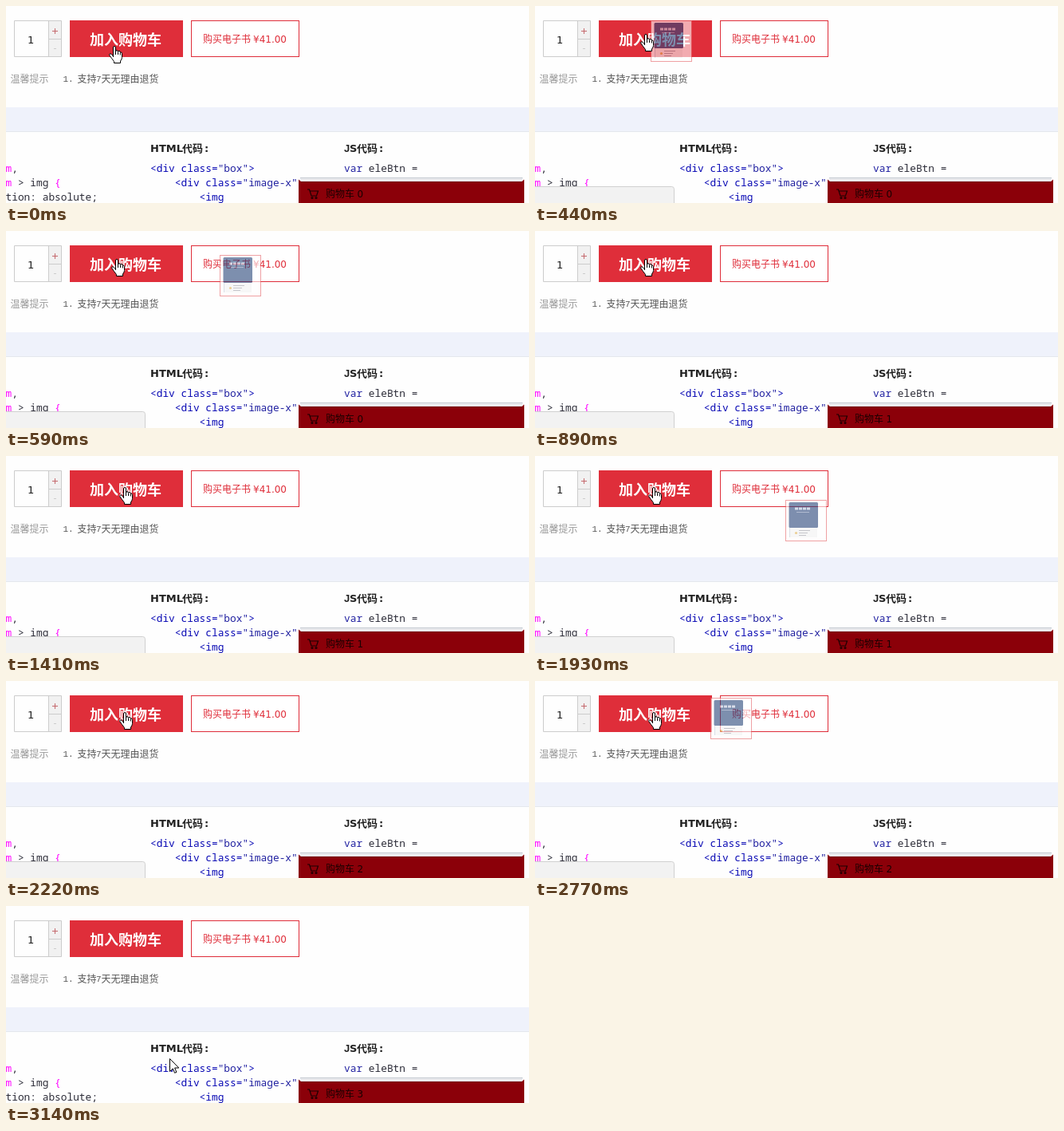
An HTML page for the animation above (4820 ms loop, 656 by 247 pixels).

```html
<!DOCTYPE html>
<html lang="zh-CN">
<head>
<meta charset="utf-8">
<title>加入购物车</title>
<style>
html, body { margin: 0; width: 100%; height: 100%; overflow: hidden; background: #fefefe; }
svg { display: block; width: 656px; height: 247px; }
text { font: 12px "Noto Sans CJK SC", "Noto Sans CJK", sans-serif; white-space: pre; }
.latin { font-family: "DejaVu Sans", sans-serif; }
.digit { font: 11px "Liberation Mono", monospace; }
.head { font-size: 13px; font-weight: bold; fill: #222; }
.code text { font: 12.83px "Noto Sans Mono", monospace; fill: #2c2c38; }
.code .tag { fill: #0808b4; }
.code .val { fill: #2020a0; }
.code .sel { fill: #f0f; }
.red { fill: #df2e3a; }
</style>
</head>
<body>
<svg viewBox="0 0 656 247">
  <!-- quantity -->
  <rect x="53" y="18" width="17" height="46" fill="#f1f1f1"/>
  <path d="M10.5 18.5H69.5V63.5H10.5ZM53.5 18.5V63.5M53.5 41.5H69.5" fill="none" stroke="#ccc"/>
  <text class="latin" x="27" y="46.5" style="font-size:13px" fill="#222">1</text>
  <path d="M58 31.5H65M61.5 28V35" stroke="#c4686c"/>
  <path d="M60 53.5H63" stroke="#ccc"/>

  <!-- buttons -->
  <rect class="red" x="80" y="18" width="142" height="46"/>
  <text x="105" y="48.5" style="font-size:18px;font-weight:bold" fill="#fff">加入购物车</text>
  <rect x="232.5" y="18.5" width="135" height="45" fill="#fff" stroke="#df2e3a"/>
  <text class="red" x="247" y="46">购买电子书</text>
  <text class="red latin" x="310" y="46">¥41.00</text>

  <!-- tip -->
  <text x="5.5" y="95.5" fill="#999">温馨提示</text>
  <g fill="#555">
    <text class="digit" x="71.5" y="95">1.</text>
    <text x="89.5" y="95.5">支持</text>
    <text class="digit" x="113" y="95">7</text>
    <text x="119.5" y="95.5">天无理由退货</text>
  </g>

  <rect y="127" width="656" height="30" fill="#eff2fb"/>
  <rect y="157" width="656" height="1" fill="#e4e7ed"/>

  <!-- code -->
  <text class="head latin" x="181" y="183">HTML</text>
  <text class="head" x="221" y="183">代码</text>
  <text class="head latin" x="249" y="183">:</text>
  <text class="head" x="424" y="183" style="font-family:'Liberation Sans',sans-serif">J</text>
  <text class="head latin" x="431" y="183">S</text>
  <text class="head" x="440" y="183">代码</text>
  <text class="head latin" x="468" y="183">:</text>
  <g class="code">
    <text x="-.5" y="208"><tspan class="sel">m</tspan>,</text>
    <text x="-.5" y="226"><tspan class="sel">m</tspan> &gt; img <tspan class="sel">{</tspan></text>
    <text x="-.5" y="244">tion: absolute;</text>
    <text class="tag" x="181" y="208">&lt;div class=<tspan class="val">"box"</tspan>&gt;</text>
    <text class="tag" x="211.8" y="226">&lt;div class=<tspan class="val">"image-x"</tspan></text>
    <text class="tag" x="242.6" y="244">&lt;img</text>
    <text x="424" y="208"><tspan class="val">var</tspan> eleBtn =</text>
  </g>

  <!-- cart bar -->
  <rect x="369" y="215" width="279" height="6" fill="#eaecf0"/>
  <rect x="369" y="215" width="279" height="1" fill="#c4c8d0"/>
  <path d="M367 217.5L370 220H647L650 217.5V247H367Z" fill="#8b0009"/>
  <path d="M370 220.5H647" stroke="#740008"/>
  <g fill="none" stroke="#1c0002" stroke-width="1.2">
    <path d="M378 230H380.5L383 238H389.5L391.5 232H381.5"/>
    <circle cx="384" cy="240.5" r="1"/>
    <circle cx="389" cy="240.5" r="1"/>
  </g>
  <text x="401" y="240" fill="#1c0002">购物车</text>
  <text id="count" class="latin" x="440.5" y="240" fill="#1c0002">0</text>

  <path id="status" d="M-1 226.5H171.5Q174.5 226.5 174.5 229.5V248H-1Z" fill="#f2f2f2" stroke="#d0d0d0"/>

  <g id="book" opacity=".6">
    <rect x=".5" y=".5" width="51" height="51" fill="#fff" stroke="#e66468"/>
    <rect x="4.5" y="3" width="36.5" height="32" rx="1.5" fill="#28457a"/>
    <path d="M12 11H32" stroke="#c0c8dc" stroke-width="3" stroke-dasharray="4 1"/>
    <path d="M14 15.5H30" stroke="#7f90b4"/>
    <rect x="6" y="35" width="34" height="12" fill="#f4f4f4"/>
    <path d="M17 38.5H31M17 41.5H28M17 44.5H26" stroke="#a0a0a8"/>
    <circle cx="13.5" cy="41.5" r="1.6" fill="#e0b050"/>
    <path d="M5.5 35V47" stroke="#c4ccd8"/>
  </g>

  <g id="hand" fill="#fff" stroke="#000" stroke-linejoin="round">
    <path d="M5.5 14V2Q5.5 .5 7 .5T8.5 2V7Q8.7 5.6 10 5.6T11.5 7.4Q11.7 6.4 13 6.4T14.3 8.2Q16.5 7.4 16.5 9.6V14.5Q16.3 17 14.5 19V21.5H6.5V19.5L3.5 15.5L.8 11.8Q.2 10 2 9.8Q3.5 10 5.5 13Z"/>
    <path d="M8.5 7V11M11.5 7.5V11M14.3 8.5V11.5" fill="none"/>
  </g>
  <path id="arrow" d="M.5 .5V16.5L4.3 12.9L6.6 18.3L8.9 17.3L6.6 12H11.8Z" fill="#fff" stroke="#000"/>
</svg>
<script>
const LOOP = 4820, CURVE = 0.00175, TOP = 15.7;
const el = id => document.getElementById(id);
const count = el('count'), status = el('status'), book = el('book'), hand = el('hand'), arrow = el('arrow');

// [time, ...values], held until the next entry
const handKeys = [[0, 129, 50], [80, 131, 42], [140, 132, 35], [1250, 135, 36], [1330, 139, 38], [1410, 142, 39]];
const arrowKeys = [[3070, 190, 150], [3140, 205, 191]];
const countKeys = [[0, 0], [890, 1], [2220, 2], [3140, 3]];
const statusKeys = [[0, 0], [300, .5], [440, 1], [3070, 0]];

// start: launch time, x: first left edge, peak: x of the vertex, speed: px per ms along the path
const flights = [
  { start: 432, x: 138, peak: 177.5, speed: .83, ticks: [440, 510, 590, 670, 720, 770, 820], end: 890 },
  { start: 1674, x: 148, peak: 164, speed: .88, ticks: [1640, 1730, 1790, 1870, 1940, 2010, 2090], end: 2170 },
  { start: 2683, x: 148, peak: 164, speed: .83, ticks: [2680, 2770, 2850, 2920, 2990, 3060], end: 3140 }
];

const at = (keys, t) => keys.filter(k => k[0] <= t).pop();
const show = (node, on) => node.setAttribute('visibility', on ? 'visible' : 'hidden');
const place = (node, x, y) => node.setAttribute('transform', `translate(${x} ${y})`);

// constant speed along a parabola
function flyTo(f, time) {
  let x = f.x;
  for (let t = f.start; t < time; t++) x += f.speed / Math.hypot(1, 2 * CURVE * (x - f.peak));
  return [Math.round(x), Math.round(TOP + CURVE * (x - f.peak) ** 2)];
}

function draw(t) {
  const pointer = at(arrowKeys, t), grip = at(handKeys, t);
  show(arrow, pointer);
  show(hand, !pointer);
  if (pointer) place(arrow, pointer[1], pointer[2]);
  place(hand, grip[1], grip[2]);

  count.textContent = at(countKeys, t)[1];
  status.setAttribute('opacity', at(statusKeys, t)[1]);

  const f = flights.find(f => t >= f.ticks[0] && t < f.end);
  show(book, f);
  if (f) place(book, ...flyTo(f, f.ticks.filter(k => k <= t).pop()));
}

const begin = performance.now();
function frame() {
  draw((performance.now() - begin) % LOOP);
  requestAnimationFrame(frame);
}
frame();
</script>
</body>
</html>
```
